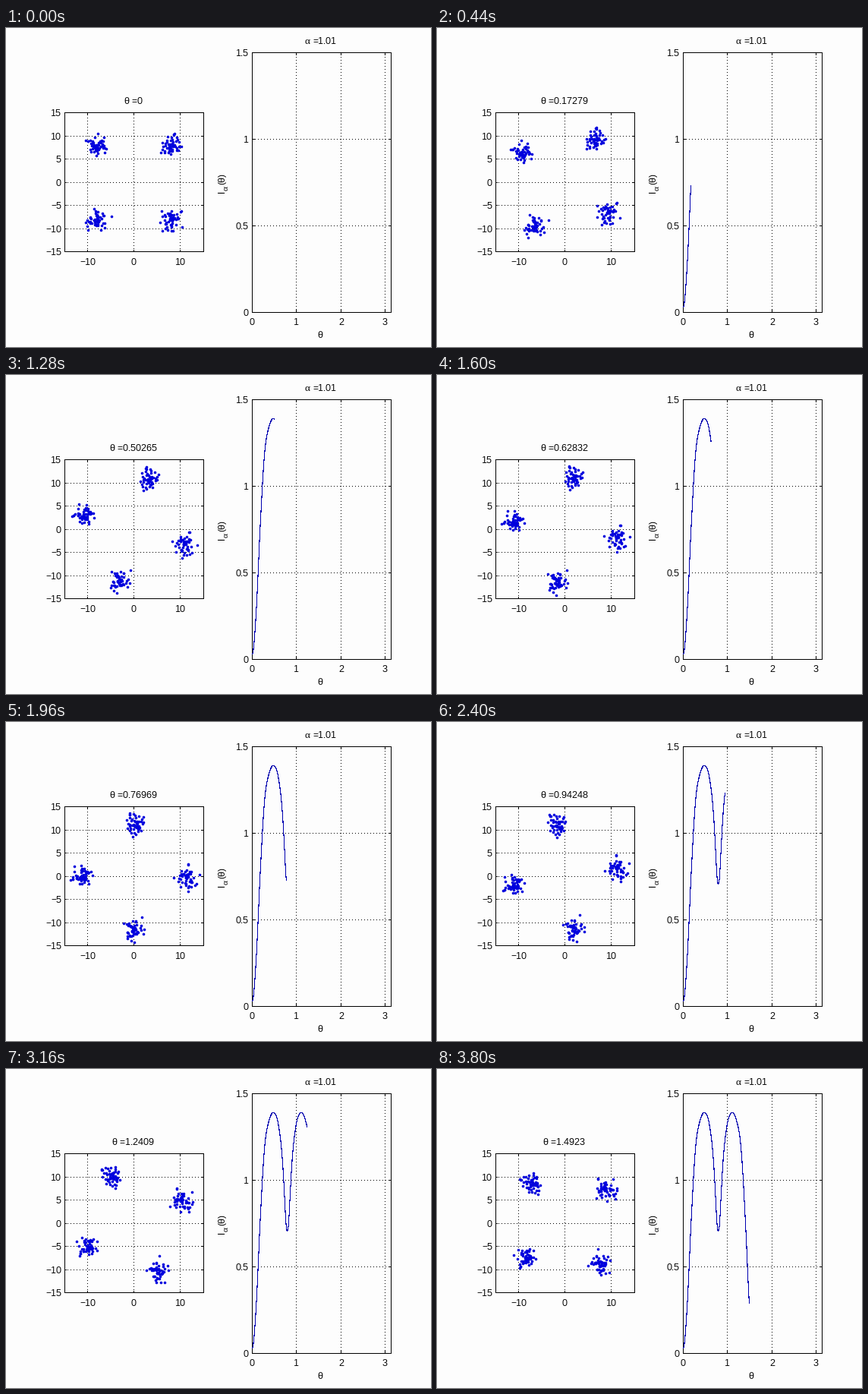
These frames come from a looping animation (560 by 420 pixels, 3.84 s). A matplotlib script:

```python
import numpy as np
import matplotlib.pyplot as plt
from matplotlib.animation import FuncAnimation

W, H, DPI = 560, 420, 100
FRAMES, INTERVAL = 96, 40
PX = 72 / DPI                       # one pixel in points
BG, INK, DOT, CURVE = "#fdfdfd", "black", "#0000dd", "#0000b0"
SERIF = "Liberation Serif"

plt.rcParams.update({
    "font.family": "Liberation Sans",
    "font.size": 12 * PX,
    "text.hinting": "native",
    "text.hinting_factor": 1,
})

fig = plt.figure(figsize=(W / DPI, H / DPI), dpi=DPI, facecolor=BG)
stage = fig.add_axes([0, 0, 1, 1])
stage.set_xlim(0, W)
stage.set_ylim(H, 0)
stage.axis("off")


def line(xs, ys, color=INK, width=1, **kw):
    return stage.plot(xs, ys, color=color, lw=width * PX, aa=False,
                      snap=False, **kw)[0]


def label(x, y, s, ha="center", **kw):
    return stage.text(x, y, s, ha=ha, va="baseline", color=INK, **kw)


def number(v):
    return f"{v:g}".replace("-", "\u2212")


class Panel:
    """A boxed plot area, placed in stage pixels."""

    def __init__(self, left, top, right, bottom, xlim, ylim):
        self.box = left + .5, top + .5, right + .5, bottom + .5
        self.xlim, self.ylim = xlim, ylim

    def x(self, v):
        l, _, r, _ = self.box
        return l + (np.asarray(v) - self.xlim[0]) / np.ptp(self.xlim) * (r - l)

    def y(self, v):
        _, t, _, b = self.box
        return b - (np.asarray(v) - self.ylim[0]) / np.ptp(self.ylim) * (b - t)

    def draw(self, xticks, yticks, tick, xbase):
        l, t, r, b = self.box
        dots = dict(ls=(0, (1, 4)), dash_capstyle="butt", zorder=1)
        for v in xticks:
            p = np.ceil(self.x(v)) - .5
            label(p, xbase, number(v))
            if l < p < r:
                line([p, p], [b + .5, t], **dots)
                line([p, p], [b, b - tick])
                line([p, p], [t, t + tick])
        for v in yticks:
            p = np.floor(self.y(v)) + .5
            label(l - 4.5, p + 4.5, number(v), ha="right")
            if t < p < b:
                line([l - .5, r], [p, p], **dots)
                line([l, l + tick], [p, p])
                line([r, r - tick], [p, p])
        line([l, r, r, l, l], [t, t, b, b, t], solid_joinstyle="miter",
             solid_capstyle="projecting")


def make_cloud(count=50, center=8, spread=1.15, reach=2.5):
    """Four seeded clusters around the corners of a square, and one stray point."""
    rng = np.random.default_rng(7)
    clusters = [
        rng.normal(0, spread, (count, 2)).clip(-reach, reach)
        + (sx * center, sy * center)
        for sx in (-1, 1) for sy in (-1, 1)
    ]
    return np.vstack(clusters + [[(-5, -7.4)]])


def information(theta):
    """Smooth curve, mirrored about its dip, through a few key points."""
    dip = .792
    t = np.abs(theta - dip)
    kx = np.array([0, .03, .055, .1, .2, .3, .4, .52, .62, .7, dip])
    ky = np.array([.706, .75, .87, 1.08, 1.32, 1.389, 1.355, 1.17, .73, .29, .03])
    slope = np.gradient(ky, kx)
    slope[[0, -1]] = 0
    i = np.clip(np.searchsorted(kx, t, side="right") - 1, 0, len(kx) - 2)
    h = kx[i + 1] - kx[i]
    s = (t - kx[i]) / h
    return ((1 + 2 * s) * (1 - s) ** 2 * ky[i] + s * (1 - s) ** 2 * h * slope[i]
            + s * s * (3 - 2 * s) * ky[i + 1] + s * s * (s - 1) * h * slope[i + 1])


scatter = Panel(77, 111, 260, 294, (-15, 15), (-15, 15))
graph = Panel(324, 32, 507, 374, (0, np.pi), (0, 1.5))
scatter.draw((-10, 0, 10), range(-15, 16, 5), 2, 312)
graph.draw(range(4), (0, .5, 1, 1.5), 3, 391)

title = label(168, 100, "")
label(393, 21, "α", ha="left", family=SERIF, fontsize=13 * PX)
label(404, 21, "=1.01", ha="left")
label(414, 408, "θ")

upright = dict(ha="left", rotation=90, rotation_mode="anchor")
label(288, 217, "I", **upright)
label(293, 214, "α", family=SERIF, fontsize=11 * PX, **upright)
label(288, 206, "(θ)", **upright)

cloud = make_cloud()
thetas = np.arange(FRAMES) * np.pi / 200
curve_x, curve_y = graph.x(thetas), graph.y(information(thetas))
dots, = stage.plot([], [], "o", color=DOT, ms=3.6 * PX, mew=0, zorder=3)
# Without antialiasing every touched pixel is filled, so a hairline is 1 px wide.
curve = line([], [], CURVE, width=.1, zorder=4)


def update(i):
    c, s = np.cos(thetas[i]), np.sin(thetas[i])
    x, y = cloud.T
    dots.set_data(scatter.x(c * x - s * y), scatter.y(s * x + c * y))
    curve.set_data(curve_x[:i + 1], curve_y[:i + 1])
    title.set_text(f"θ ={thetas[i]:.5g}")
    return dots, curve, title


anim = FuncAnimation(fig, update, frames=FRAMES, init_func=lambda: update(0),
                     interval=INTERVAL, repeat=True, repeat_delay=0, blit=False)
plt.show()
```
